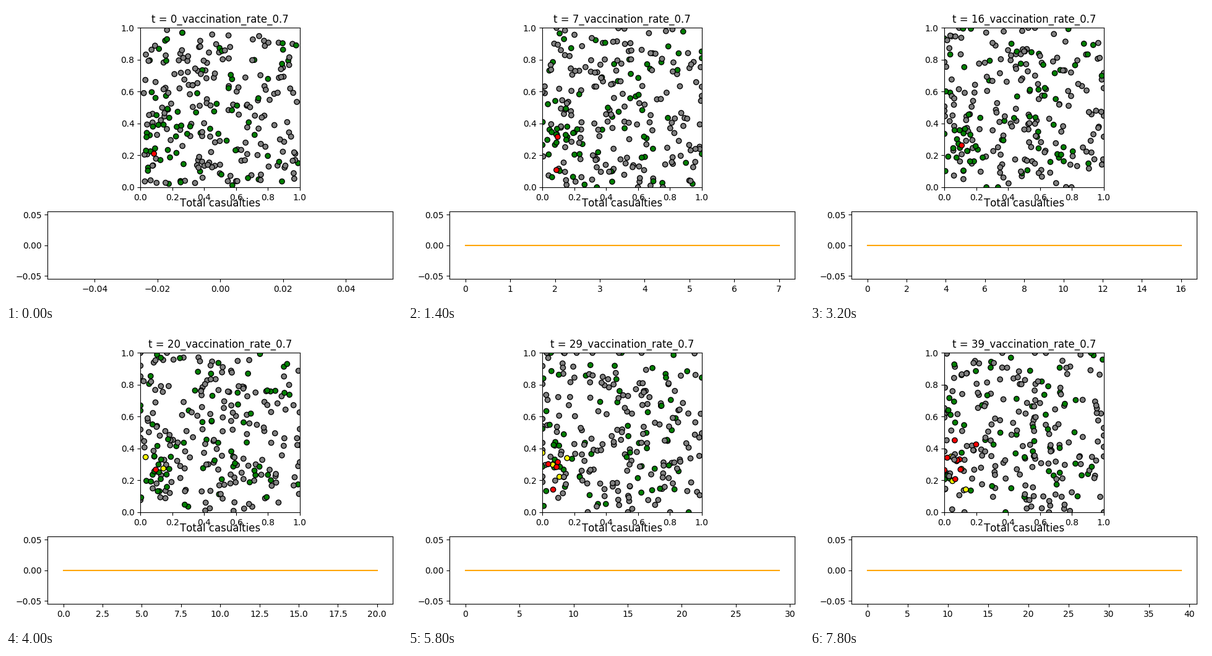
Recreate the animation shown at these times as a matplotlib script. Size 640 by 480 pixels, loop 8 s.

```python
import numpy as np
import matplotlib.pyplot as plt
from matplotlib.animation import FuncAnimation

plt.rcParams["text.kerning_factor"] = 6  # whole-pixel kerning

W, H, DPI = 640, 480, 100
FRAMES, INTERVAL = 40, 200
IMMUNE, SUSCEPTIBLE = 175, 60
STEP = 0.03

# Outbreak: two early cases, then a steady stream; newest first
INCUBATION, COURSE = 6, 20
ONSETS = np.append(np.linspace(38, 17, 14), [1, -INCUBATION])
FIRST_CASE = (0.085, 0.21)
CENTRE = np.array([0.1, 0.28])
PULL = 0.1

rng = np.random.default_rng(11)


def random_walk(start, pull=0):
    """Walks that stop at the walls and may be drawn towards the outbreak."""
    path = [start]
    for _ in range(FRAMES - 1):
        here = path[-1]
        move = rng.normal(0, STEP, here.shape) + pull * (CENTRE - here)
        path.append(np.clip(here + move, 0, 1))
    return np.array(path)


def case_color(age):
    if age < 0:
        return "green"
    if age < INCUBATION:
        return "yellow"
    return "red" if age < COURSE else "gray"


def pixel_axes(left, top, right, bottom):
    return fig.add_axes([left / W, 1 - bottom / H,
                         (right - left) / W, (bottom - top) / H])


healthy = ["gray"] * IMMUNE + ["green"] * SUSCEPTIBLE
crowd = rng.uniform(0.01, 0.99, (len(healthy), 2))
order = rng.permutation(len(healthy))
healthy = [healthy[i] for i in order]

cluster = rng.uniform((0, 0.1), (0.3, 0.5), (len(ONSETS), 2))
cluster[-1] = FIRST_CASE
paths = np.concatenate([random_walk(crowd), random_walk(cluster, PULL)], axis=1)

fig = plt.figure(figsize=(W / DPI, H / DPI), dpi=DPI)
room = pixel_axes(217.3, 35.3, 474.9, 292.9)
room.set(xlim=(0, 1), ylim=(0, 1))
dots = room.scatter(paths[0, :, 0], paths[0, :, 1], s=36,
                    edgecolors="black", linewidths=1)
title = room.set_title("")

chart = pixel_axes(67.3, 332.4, 625.1, 441.2)
chart.set_title("Total casualties")
chart.set_ylim(-0.055, 0.055)
line, = chart.plot([], [], color="orange")


def update(t):
    dots.set_offsets(paths[t])
    dots.set_facecolors(healthy + [case_color(t - onset) for onset in ONSETS])
    title.set_text(f"t = {t}_vaccination_rate_0.7")
    line.set_data(np.arange(t + 1), np.zeros(t + 1))
    margin = 0.05 * t if t else 0.055
    chart.set_xlim(-margin, t + margin)
    return dots, title, line


anim = FuncAnimation(fig, update, frames=FRAMES, interval=INTERVAL, repeat=True)
plt.show()
```
